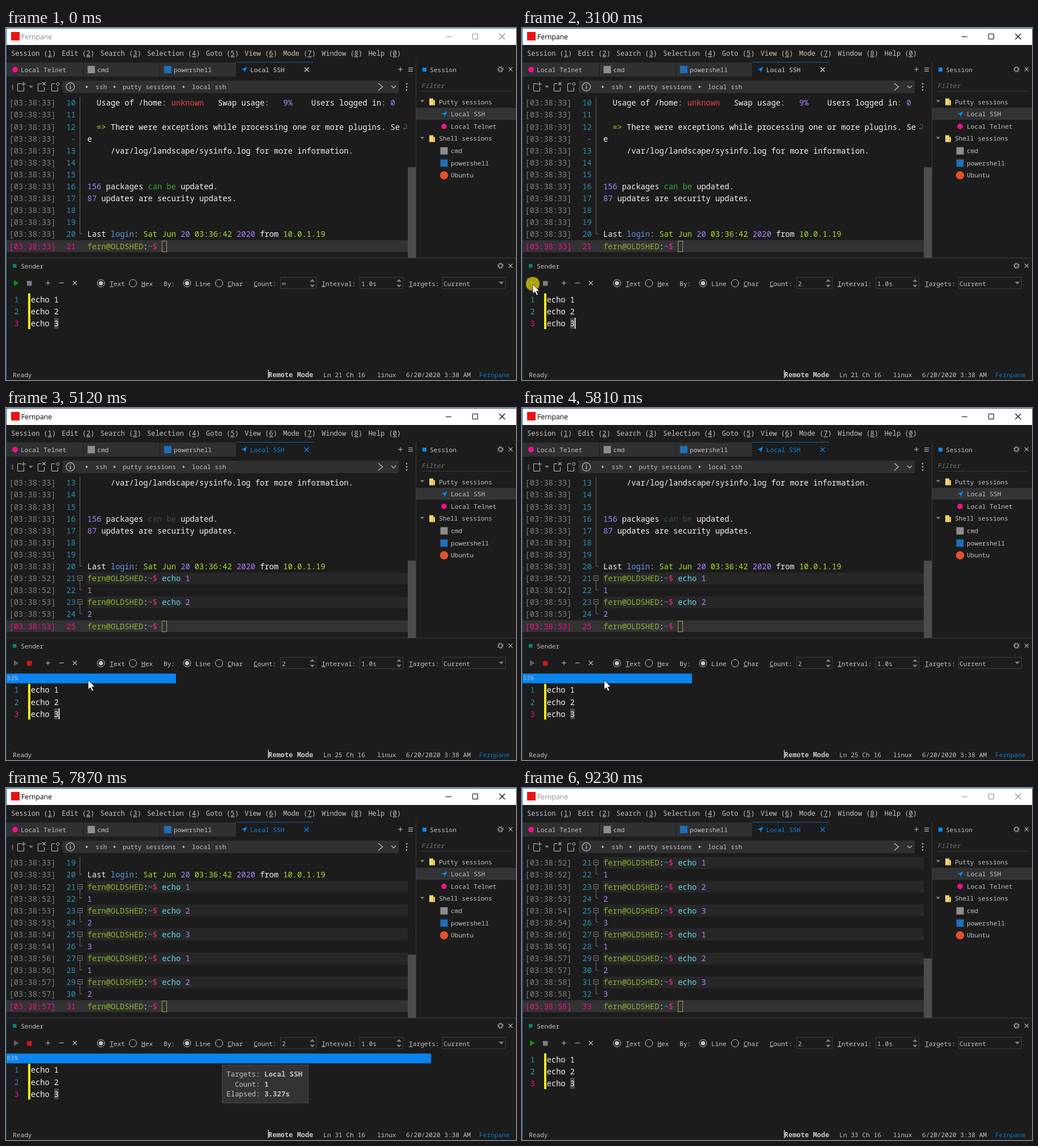
An HTML page that plays this animation: 900x622 px, repeating every 9.59 s.

```html
<!DOCTYPE html>
<html lang="en">
<head>
<meta charset="utf-8">
<title>Sender demo</title>
<style>
  html, body { margin: 0; width: 100%; height: 100%; overflow: hidden; background: #1c1c1c; }
  svg { display: block; }
  text { white-space: pre; font-family: 'Noto Sans Mono', 'DejaVu Sans Mono', monospace; }
  .title { font-family: 'Open Sans', 'Noto Sans', sans-serif; }
</style>
</head>
<body>
<svg width="900" height="622" viewBox="0 0 900 622"><g id="base"></g><g id="live"></g></svg>
<script>
const LOOP = 9590, ROWS = 13, ROW_H = 21.1, TOP = 132.4;
const APP = 'Fernpane', USER = 'fern@OLDSHED';
const UI = 11.2, MENU = 12, TERM = 13.72;
const GREY = '#c4c4c4', LINE = '#3c3c3e', PANEL = '#303033', BLUE = '#0a8cf5', PINK = '#f5108a', TEAL = '#2b91af';
const INK = { w: '#f4f4f0', g: '#a6e22e', u: '#86b52c', r: '#f04545', p: '#ae81ff', b: '#6796e6',
              c: '#66d9ef', k: '#f92672', t: '#3a8fd0', n: '#2fae3c', d: '#2b5c30' };

// --- drawing helpers; text is placed by its vertical middle ---
const text = (x, y, s, fill = GREY, size = UI, more = '') =>
  `<text x="${x}" y="${(y + size * .36).toFixed(2)}" font-size="${size}" fill="${fill}" ${more}>${s}</text>`;
const rect = (x, y, w, h, fill, more = '') =>
  `<rect x="${x}" y="${y}" width="${w}" height="${h}" fill="${fill}" ${more}/>`;
const frame = (x, y, w, h, stroke) => rect(x + .5, y + .5, w - 1, h - 1, 'none', `stroke="${stroke}"`);
const disc = (x, y, r, fill, more = '') => `<circle cx="${x}" cy="${y}" r="${r}" fill="${fill}" ${more}/>`;
const line = (d, stroke = GREY, w = 1) => `<path d="${d}" fill="none" stroke="${stroke}" stroke-width="${w}"/>`;
const shape = (d, fill, more = '') => `<path d="${d}" fill="${fill}" ${more}/>`;
const cross = (x, y, r, c = GREY, w = 1.1) =>
  line(`M${x - r} ${y - r}l${2 * r} ${2 * r}M${x + r} ${y - r}l${-2 * r} ${2 * r}`, c, w);
const plus = (x, y) => line(`M${x - 4} ${y}h8M${x} ${y - 4}v8`);
const down = (x, y, w = 4.5) => shape(`M${x - w} ${y - w / 2}h${2 * w}l${-w} ${w}z`, '#808080');
const up = (x, y, w = 4.5) => shape(`M${x - w} ${y + w / 2}h${2 * w}l${-w} ${-w}z`, '#808080');
const plane = (x, y) => shape(`M${x + 5} ${y - 5}l-10 4.8 4.7 .8 1 4.6z`, BLUE);
const gear = (x, y) => disc(x, y, 3.2, 'none', `stroke="${GREY}"`) +
  disc(x, y, 4.6, 'none', `stroke="${GREY}" stroke-width="1.6" stroke-dasharray="1.5 2.11"`);
const folder = (x, y) => shape(`M${x - 5} ${y - 6}h7v3h3v9h-10z`, '#f3d36b') +
  line(`M${x + 2.5} ${y - 3}v9`, '#c9a540');
const hot = s => s.replace(/_(.)/, '<tspan text-decoration="underline">$1</tspan>');
const runs = s => {
  const p = s.split('|');
  let out = '';
  for (let i = 0; i < p.length; i += 2) out += `<tspan fill="${INK[p[i]]}">${p[i + 1]}</tspan>`;
  return out;
};

// --- parts that never change ---
function menuBar() {
  let x = 9, out = '';
  ['Session (_1)', 'Edit (_2)', 'Search (_3)', 'Selection (_4)', 'Goto (_5)', 'View (_6)',
   'Mode (_7)', 'Window (_8)', 'Help (_0)'].forEach(s => {
    out += text(x, 45, hot(s), GREY, MENU);
    x += (s.length - 1) * 7.2 + 10.4;
  });
  return out;
}

function tabs() {
  return [1, 137, 272].map(x => rect(x, 61, x > 1 ? 134 : 135, 25, PANEL)).join('') +
    line('M407 60.5H542', '#0a64b0') +
    disc(16, 73.5, 5, PINK) + text(26, 73.5, 'Local Telnet') +
    rect(144, 67, 13, 13, '#8c8c8c') + text(161, 73.5, 'cmd') +
    rect(279, 67, 13, 13, '#1f6fb8') + text(296, 73.5, 'powershell') +
    plane(420.5, 73.5) + plus(696, 73) +
    line('M710 70.5h8M710 73.5h8M710 76.5h8');
}

function pathBar() {
  const page = x => line(`M${x + 6} 98.5h-6v13h11v-7`);
  const crumbs = [[141, 'ssh', 158], [190, 'putty sessions', 206], [312, 'local ssh', 328]];
  return line('M11.5 100v9', '#666', 2) + page(20.5) + plus(31, 99) + down(44, 104, 4) +
    page(56.5) + cross(67, 98.5, 2.5) + page(80.5) + disc(91.5, 99, 2.5, 'none', `stroke="${GREY}"`) +
    rect(100, 93, 593, 22, PANEL) + disc(113.5, 104, 7.3, 'none', `stroke="${GREY}" stroke-width="1.2"`) +
    line('M113.5 102.5v5.5M113.5 99.5v1.5', GREY, 1.5) +
    crumbs.map(([a, s, x]) => shape(`M${a} 101.5l4 2.5-4 2.5z`, GREY) + text(x, 104, s)).join('') +
    line('M657 97.5l7.5 6.5-7.5 6.5', GREY, 1.2) + line('M680 102l4 4 4-4', GREY, 1.2) +
    [98.5, 104, 109.5].map(y => disc(707, y, 1.3, GREY)).join('');
}

function sidePanel() {
  const row = i => 130.5 + i * 21.65;
  const head = (i, s) => down(734.5, row(i) - 1, 4) + folder(752, row(i)) + text(764, row(i), s);
  const item = (i, s) => text(785, row(i), s);
  return rect(735, 70, 7, 7, BLUE) + text(748, 73.5, 'Session') + gear(872.5, 73) + cross(890.5, 73, 3.3) +
    text(733, 102, 'Filter', '#747474', UI, 'font-style="italic"') + line('M733 111.5H894', LINE) +
    rect(724, 141, 176, 21, '#333336') +
    head(0, 'Putty sessions') + plane(773.5, row(1)) + item(1, 'Local SSH') +
    disc(773, row(2), 4.8, PINK) + item(2, 'Local Telnet') +
    head(3, 'Shell sessions') + rect(766.5, row(4) - 6.5, 13, 13, '#8c8c8c') + item(4, 'cmd') +
    rect(766.5, row(5) - 6.5, 13, 13, '#1f6fb8') + item(5, 'powershell') +
    disc(773, row(6), 7.3, '#e2512c') + item(6, 'Ubuntu');
}

function senderBar() {
  const radio = (x, on, s, tx) => disc(x, 451, 6.5, 'none', `stroke="${GREY}"`) +
    (on ? disc(x, 451, 3.8, GREY) : '') + text(tx, 451.5, hot(s));
  const spin = (x, w) => frame(x, 440, w, 21, LINE) + up(x + w - 7.5, 446) + down(x + w - 7.5, 456);
  return rect(12, 417, 6.5, 6.5, '#0b8276') + text(26, 420.5, 'Sender') + gear(872.5, 420) + cross(890.5, 420, 3.3) +
    plus(74, 450.5) + line('M93.5 450.5h8.5') + cross(121.5, 450.5, 3.5) +
    radio(167.5, 1, '_Text', 183) + radio(224, 0, '_Hex', 239) + text(278, 451.5, 'By:') +
    radio(319.5, 1, 'Line', 334) + radio(376, 0, '_Char', 391) +
    text(437, 451.5, hot('_Count:')) + spin(484, 64) +
    text(557, 451.5, hot('_Interval:')) + spin(624, 77) + text(627, 451.5, '1.0s') +
    text(711, 451.5, hot('_Targets:')) + frame(770, 440, 112, 21, LINE) + text(772, 451.5, 'Current') +
    down(874, 450.5);
}

function base() {
  return rect(0, 0, 900, 622, '#1c1c1c') + rect(1, 1, 899, 29, '#fff') + rect(9, 7, 15, 15, '#ee1111') +
    menuBar() + tabs() + pathBar() + sidePanel() + senderBar() +
    line('M723.5 60V406M1 406.5H900', LINE) +
    text(12, 612.5, 'Ready') + text(463, 612.5, 'Remote Mode', GREY, MENU, 'font-weight="bold"') +
    line('M463 604v15', '#eee', 1.2) + text(655, 612.5, 'linux') +
    text(706, 612.5, '6/20/2020 3:38 AM') + text(835, 612.5, APP, '#0a78d0');
}

// --- timeline ---
const SENDS = [3760, 4800, 5820, 6880, 7870, 8910];
const SECONDS = [52, 53, 54, 56, 57, 58];
const POINTER = [ // time, x, y, kind
  [0, 0, 0, ''], [330, 470, 520, 'arrow'], [672, 539, 447, 'arrow'], [1013, 539, 447, 'click'],
  [1355, 539, 447, 'arrow'], [1697, 539, 447, 'click'], [2038, 539, 447, 'arrow'], [2380, 400, 455, 'arrow'],
  [2740, 130, 458, 'arrow'], [3100, 19, 453, 'click'], [3420, 19, 453, 'arrow'], [3760, 90, 470, 'arrow'],
  [4090, 175, 493, 'beam'], [4800, 150, 484, 'arrow'], [5120, 145, 481, 'arrow'], [5820, 220, 481, 'arrow'],
  [6170, 310, 481, 'arrow'], [6520, 380, 481, 'arrow'], [7490, 0, 0, '']
];
const last = (track, t) => track.filter(p => p[0] <= t).pop();

const PROMPT = `u|${USER}|w|:|t|~|k|$ `;
const intro = faded => [
  [10, 'w|  Usage of /home|g|: |r|unknown|w|   Swap usage|g|:   |p|9%|w|    Users logged in|g|: |p|0'],
  [11, ''],
  [12, 'g|  =&gt;|w| There were exceptions while processing one or more plugins. Se'],
  ['-', 'w|e'],
  [13, 'w|     /var/log/landscape/sysinfo.log for more information.'],
  [14, ''], [15, ''],
  [16, `p|156|w| packages |${faded ? 'd' : 'n'}|can be|w| updated.`],
  [17, 'p|87|w| updates are security updates.'],
  [18, ''], [19, ''],
  [20, 'w|Last |b|login|g|: Sat Jun |p|20|g| 03:36:42 |p|2020|w| from |g|10.0.1.19']
].map(([n, s]) => ({ n, s, sec: 33, fold: n === 20 ? 'end' : 'mid' }));

function terminal(sent, faded) {
  const rows = intro(faded);
  for (let i = 0; i < sent; i++) {
    const n = 21 + 2 * i, arg = i % 3 + 1, sec = SECONDS[i];
    rows.push({ n, s: `${PROMPT}|c|echo |p|${arg}`, sec, fold: 'start' },
              { n: n + 1, s: `p|${arg}`, sec, fold: 'end' });
  }
  rows.push({ n: 21 + 2 * sent, s: PROMPT, sec: sent ? SECONDS[sent - 1] : 33, fold: 'now' });

  const thumb = 283 * ROWS / (23 + 2 * sent);
  return rows.slice(-ROWS).map((r, i) => {
    const y = TOP + i * ROW_H, a = y - ROW_H / 2, b = y + ROW_H / 2, now = r.fold === 'now';
    const fold = {
      mid: line(`M130.5 ${a}V${b}`, '#666'),
      end: line(`M130.5 ${a}V${Math.floor(y) - .5}h4`, '#666'),
      start: frame(126, Math.round(y) - 5, 9, 9, '#777') +
        line(`M128 ${Math.round(y) - .5}h5M130.5 ${Math.round(y) + 4}V${b}`, '#777'),
      now: ''
    }[r.fold];
    return (now ? rect(1, 375, 708, 21, '#323234') : '') +
      (r.fold === 'start' ? rect(143, Math.round(a), 566, 21, '#272728') : '') + fold +
      text(5.5, y, `[03:38:${r.sec}]`, now ? PINK : '#808080', TERM) +
      text(123, y, r.n, now ? PINK : TEAL, TERM, 'text-anchor="end"') +
      (r.s ? text(143.5, y, runs(r.s), '#fff', TERM) : '') +
      (r.n === 12 ? line(`M702 ${y - 4}h5v7h-6m3-2l-3 2 3 2`, '#2b6f85') : '') +
      (now ? frame(275, 376, 9, 20, '#b59a5a') : '');
  }).join('') + rect(709, 406 - thumb, 14, thumb, '#4c4c4e');
}

function titleBar(active) {
  const c = active ? '#000' : '#8c8c8c', edge = active ? '#0f5488' : '#1d80c2';
  return rect(0, 0, 900, 1, edge) + rect(0, 0, 1, 622, edge) +
    text(27, 15.5, APP, c, 12.2, 'class="title"') +
    line('M776 15.5h10M823.5 10.5h9v9h-9z', c) + cross(875.5, 15, 5, c);
}

function editor(running, sent, caret) {
  const y = running ? 498.5 : 480;
  let out = '';
  if (running) out += rect(1, 469, 150 * sent - 1, 17.5, '#0a84ee') + rect(1, 469, 150 * sent - 1, 1, '#0a6cc4') +
    text(1, 477, Math.floor(sent * 100 / 6) + '%', '#a9bccd', UI);
  out += rect(39, y - 11, 4, 63, '#f5ee1e') + rect(85, y + 32.5, 8, 19, '#4a4a4c');
  for (let i = 0; i < 3; i++)
    out += text(14.5, y + i * 21.1, i + 1, i < 2 ? TEAL : PINK, TERM) +
      text(43.7, y + i * 21.1, `echo ${i + 1}`, INK.w, TERM);
  return out + (caret ? rect(93, y + 32, 1.6, 19.5, '#f0f0f0') : '');
}

function tooltip() {
  return rect(381, 489, 153, 68, '#333335') + frame(381, 489, 153, 68, '#48484a') +
    [['Targets:', 'Local SSH'], ['Count:', '1'], ['Elapsed:', '3.327s']].map(([k, v], i) =>
      text(448.5, 506 + i * 17.5, k, GREY, 12.4, 'text-anchor="end"') +
      text(456, 506 + i * 17.5, v, GREY, 12.4, 'font-weight="bold"')).join('');
}

function pointer([, x, y, kind]) {
  if (!kind) return '';
  if (kind === 'beam')
    return line(`M${x - 4} ${y - 8.5}h3l1 1 1-1h3M${x} ${y - 8}v16M${x - 4} ${y + 8.5}h3l1-1 1 1h3`, '#fff', 1.5);
  return (kind === 'click' ? disc(x, y - 1, 12.3, '#d2bd10', 'opacity=".78"') : '') +
    shape(`M${x} ${y}v16.5l3.8-3.6 2.7 6.3 2.8-1.2-2.7-6.2h5.2z`, '#fff', 'stroke="#111" stroke-width=".8"');
}

function live(t) {
  const sent = SENDS.filter(s => s <= t).length;
  const running = sent > 0 && sent < 6, lit = sent > 0;
  const active = t >= 330 && t < 9230;
  const caret = active && t > 2740 && (t - 2950 + LOOP * 0 + 1060) % 1060 < 530;
  const count = t < 1013 ? '∞' : t < 1697 ? '1' : '2';
  const tab = lit ? BLUE : '#e0e0e0';
  return titleBar(active) + text(431, 73.5, 'Local SSH', tab) + cross(530.5, 73.5, 3.7, tab, 1.3) +
    terminal(sent, lit) +
    (t >= 3100 && t < 3760 ? rect(8, 441, 20, 20, '#38383a') : '') +
    shape('M14 445.5l8.5 5.2-8.5 5.2z', running ? '#606060' : '#0b8f12') +
    rect(37, 447, 8.5, 8.5, running ? '#c41a1a' : '#7c7c7c') +
    text(487, 451.5, count) + editor(running, sent, caret) +
    text(560, 612.5, `Ln ${21 + 2 * sent} Ch 16`) +
    (t >= 7150 && running ? tooltip() : '') + pointer(last(POINTER, t));
}

const liveLayer = document.getElementById('live');
let shown = '';
function tick() {
  const next = live(performance.now() % LOOP);
  if (next !== shown) liveLayer.innerHTML = shown = next;
  requestAnimationFrame(tick);
}
document.getElementById('base').innerHTML = base();
tick();
</script>
</body>
</html>
```
